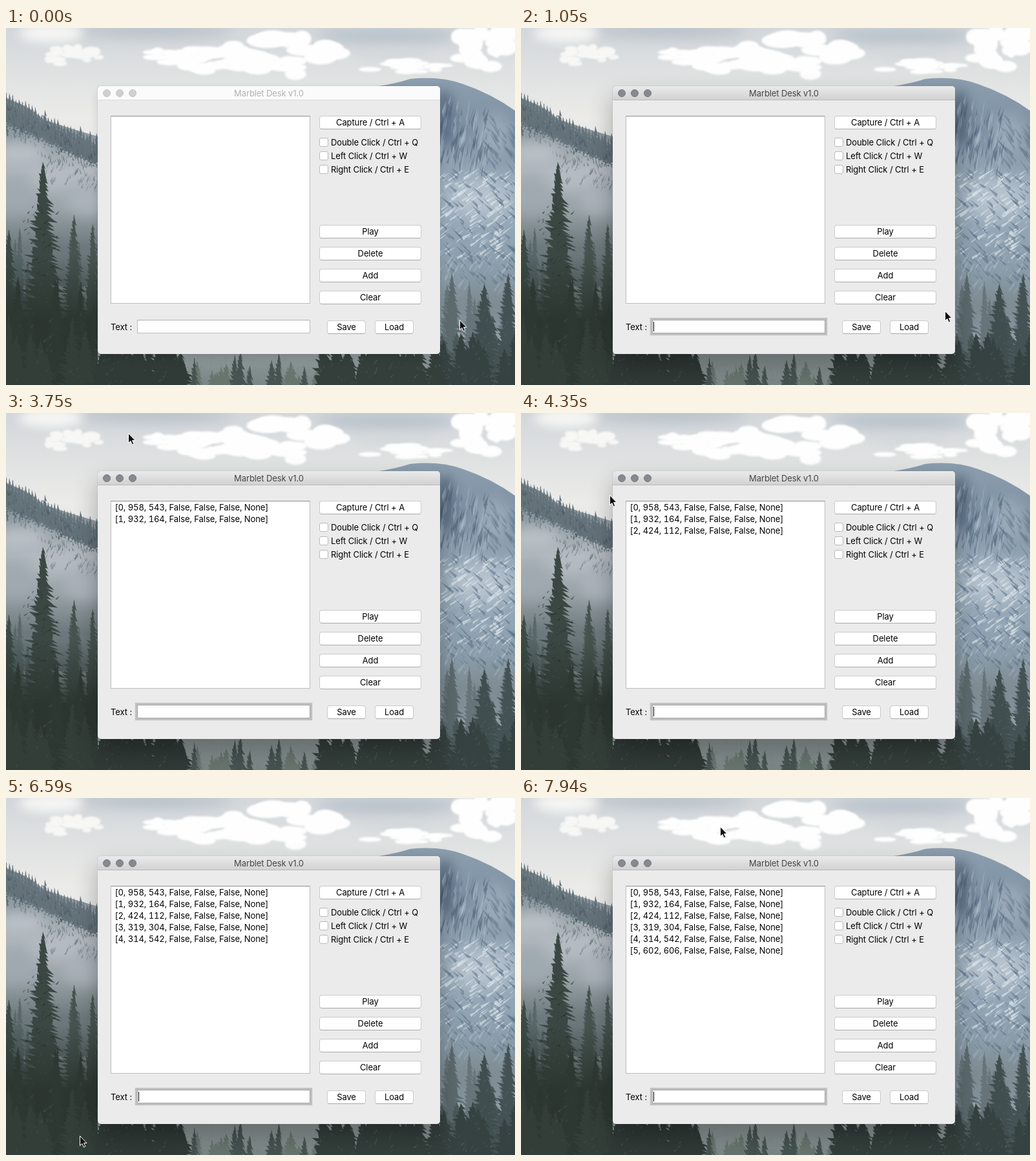
Animation of 788x553 px, one loop 8000 ms. Source, as an HTML page with a canvas:

```html
<!DOCTYPE html>
<html lang="en">
<head>
<meta charset="utf-8">
<style>
  html, body { margin: 0; width: 100%; height: 100%; overflow: hidden; }
  body { position: relative; font: 13px/18px Inter, sans-serif; letter-spacing: -.1px; color: #000; }
  canvas, #cursor { position: absolute; left: 0; top: 0; }
  #cursor { overflow: visible; }
  #win, #win div { position: absolute; box-sizing: border-box; white-space: pre; }
  #win { left: 142px; top: 90px; width: 530px; height: 415px; border-radius: 5px; background: #ebebeb;
    box-shadow: 0 0 1px rgba(0,0,0,.45), 0 6px 14px rgba(0,0,0,.12); }
  #win.active { box-shadow: 0 0 1px rgba(0,0,0,.5), 0 18px 36px rgba(0,0,0,.3); }
  #win .bar { left: 0; top: 0; width: 530px; height: 22px; border-radius: 5px 5px 0 0; text-align: center;
    line-height: 22px; color: #b1b1b1; background: #fbfbfb; border-bottom: 1px solid #d9d9d9; }
  #win.active .bar { color: #454545; background: linear-gradient(#eaeaea, #d2d2d2); border-color: #b9b9b9; }
  #win .light { width: 12px; height: 12px; border-radius: 50%; background: #d0d0d0; border: 1px solid #c4c4c4; }
  #win.active .light { background: #858a90; border-color: #757a80; }
  #win .box { background: #fff; border: 1px solid #bebebe; border-top-color: #8e8e8e; }
  #win .field { border-top-color: #b0b0b0; }
  #win.active .field { box-shadow: 0 0 1px 3px #c0c0c0; border-color: #a8a8a8; }
  #win .button { background: #fff; border: 1px solid #cbcbcb; border-bottom-color: #aaa; border-radius: 4px;
    text-align: center; line-height: 19px; }
  #win .pressed { background: linear-gradient(#96999e, #6c7077); border-color: #72767c; color: #fff; }
  #win .check { background: #fff; border: 1px solid #bababa; border-radius: 3px; }
  #win .row { font-variant-numeric: tabular-nums; letter-spacing: -.07px; }
  #win .caret { background: #000; }
</style>
</head>
<body>
<canvas id="scene" width="788" height="553"></canvas>
<div id="win"></div>
<svg id="cursor" width="12" height="19">
  <path d="M0 0V15L3.4 11.9L5.8 17.4L8.3 16.3L6 11H10.5Z" fill="#111" stroke="#fff"/>
</svg>
<script>
const W = 788, H = 553, LOOP = 8000, STEP = 150, ACTIVATE = 1050;
const ctx = document.getElementById('scene').getContext('2d');
const win = document.getElementById('win');
const cursor = document.getElementById('cursor');

// ---- Landscape ----
let seed = 7;
const rnd = (a = 0, b = 1) => {
  seed = (seed * 16807) % 2147483647;
  return a + (b - a) * seed / 2147483647;
};
function shade(y0, y1, ...colors) {
  const g = ctx.createLinearGradient(0, y0, 0, y1);
  colors.forEach((c, i) => g.addColorStop(i / (colors.length - 1), c));
  return g;
}
function blob(x, y, rx, ry, color, blur = 8) {
  ctx.filter = `blur(${blur}px)`;
  ctx.fillStyle = color;
  ctx.beginPath();
  ctx.ellipse(x, y, rx, ry, 0, 0, 7);
  ctx.fill();
  ctx.filter = 'none';
}
// A ragged cloud: a heap of small puffs inside an ellipse
function cloud(x, y, rx, ry, color) {
  for (let i = 0; i < 26; i++) {
    const a = rnd(0, 6.28), r = rnd() ** .5;
    blob(x + rx * r * Math.cos(a), y + ry * r * Math.sin(a), rnd(.12, .34) * rx, rnd(.2, .4) * ry, color, 1.5);
  }
}
function shape(fill, path) {
  ctx.fillStyle = fill;
  ctx.fill(new Path2D(path));
}
// Short slanted slivers along a band that may slope
function slivers(count, x0, x1, y0, y1, dx, dy, color, slope = 0) {
  ctx.fillStyle = color;
  for (let i = 0; i < count; i++) {
    const x = rnd(x0, x1), y = rnd(y0, y1) + slope * (x - x0), k = rnd(.3, 1);
    ctx.beginPath();
    ctx.moveTo(x, y);
    ctx.lineTo(x + dx * k, y + dy * k);
    ctx.lineTo(x + dx * k + rnd(-3, 3), y + dy * k * .5 + rnd(1, 4));
    ctx.fill();
  }
}
function tree(x, top, base, half, color) {
  ctx.fillStyle = color;
  ctx.beginPath();
  ctx.moveTo(x, top);
  const side = (dir, y) => {
    const reach = half * Math.min(1, (y - top) / (base - top) * 1.5) ** .85;
    ctx.lineTo(x + dir * (1 + reach * rnd(.45, 1.15)), y + rnd(-1, 3));
    ctx.lineTo(x + dir * reach * rnd(.25, .6), y - dir * 2);
  };
  for (let y = top + 5; y < base; y += 6) side(1, y);
  for (let y = base; y > top + 4; y -= 6) side(-1, y);
  ctx.fill();
}
function forest(count, x0, x1, top0, top1, half, color) {
  for (let i = 0; i < count; i++) tree(rnd(x0, x1), rnd(top0, top1), H + 20, rnd(.7, 1.2) * half, color);
}
function drawScene() {
  ctx.fillStyle = shade(0, H, '#d3d7da', '#ebebe9', '#e2e3e3', '#a9b3ba', '#7d8789');
  ctx.fillRect(0, 0, W, H);
  blob(230, 4, 120, 12, '#b9c2ca', 10);
  blob(590, 12, 110, 14, '#b9c3cc', 10);
  blob(600, 40, 50, 7, '#d2d7da');
  blob(70, 8, 50, 14, '#f6f6f5');
  cloud(100, 45, 45, 16, '#f7f7f6');
  cloud(280, 50, 72, 18, '#fefefe');
  cloud(425, 46, 95, 32, '#fefefe');
  cloud(618, 62, 62, 12, '#fefefe');
  cloud(750, 28, 58, 34, '#fefefe');

  // left ridge and mist
  shape(shade(105, 340, '#7d8990', '#8f9aa2', '#b3babf', '#98a2a7', '#6c787b'),
    'M0 108L30 121L62 143L92 153L142 168V400H0Z');
  for (let x = 0; x < 146; x += 5) tree(x, 98 + x * .46 + rnd(0, 12), 150 + x * .45, 6, '#64727a');
  slivers(170, 0, 146, 116, 166, 2, 13, 'rgba(69,84,93,.55)', .48);
  blob(22, 195, 38, 18, '#b9c0c5', 10);
  blob(75, 232, 50, 16, '#b4bcc2', 10);
  blob(125, 265, 32, 24, '#aab3b9', 10);
  blob(15, 255, 30, 28, '#9fa9b0', 12);
  slivers(50, 60, 146, 196, 226, -6, 14, 'rgba(88,103,112,.4)', .35);

  // right mountain
  shape(shade(78, 420, '#8c9eae', '#7c90a3', '#9cadbc', '#90a3b3', '#84959f'),
    'M540 95Q600 88 625 79Q672 74 708 87Q752 102 788 128V470H540Z');
  blob(680, 140, 16, 44, 'rgba(75,96,117,.6)', 8);
  blob(756, 165, 28, 32, 'rgba(170,184,197,.6)', 10);
  blob(735, 265, 50, 30, 'rgba(196,207,217,.7)', 14);
  slivers(90, 674, 752, 100, 195, -6, 42, 'rgba(178,192,204,.4)', .2);
  slivers(70, 672, 750, 105, 200, -7, 38, 'rgba(66,88,109,.38)', .2);
  slivers(60, 735, 790, 125, 200, 16, 26, 'rgba(92,113,133,.35)', .3);
  slivers(190, 668, 788, 215, 350, -18, 15, 'rgba(225,232,238,.62)');
  slivers(150, 668, 788, 215, 390, 15, 17, 'rgba(86,108,129,.5)');
  slivers(60, 668, 788, 340, 410, -12, 22, 'rgba(190,202,212,.4)');

  // right forest
  blob(730, 430, 80, 24, '#7f8c92', 14);
  forest(7, 672, 790, 390, 425, 20, '#67757a');
  tree(690, 378, 573, 24, '#5c6a6e');
  forest(8, 672, 790, 430, 475, 24, '#4b585a');
  tree(740, 397, 573, 33, '#414e50');
  tree(777, 380, 573, 28, '#455255');
  forest(9, 672, 790, 465, 510, 26, '#364241');
  slivers(110, 672, 788, 430, 545, -6, 7, 'rgba(108,122,122,.3)');

  // left forest
  forest(9, -8, 150, 305, 360, 20, '#59676a');
  tree(105, 289, 573, 27, '#46534f');
  tree(134, 303, 573, 24, '#485552');
  tree(4, 312, 573, 30, '#3c4945');
  tree(57, 207, 500, 38, '#3b4743');
  shape(shade(350, H, 'rgba(43,53,48,0)', '#2c3631', '#2a332e'), 'M0 350H142V553H0Z');
  forest(10, -5, 145, 385, 470, 22, '#2e3833');
  forest(8, -5, 150, 440, 505, 22, '#323e37');
  slivers(130, 0, 142, 330, 545, -6, 7, 'rgba(96,112,102,.28)');
  slivers(60, 28, 84, 270, 400, -7, 6, 'rgba(30,39,36,.6)');

  // foot of the valley
  shape(shade(495, H, '#929c9c', '#7a8685'), 'M142 495H672V553H142Z');
  forest(24, 140, 275, 470, 505, 22, '#303a37');
  forest(16, 285, 480, 500, 540, 12, '#68756f');
  forest(8, 285, 480, 500, 535, 10, '#465350');
  forest(28, 480, 680, 470, 512, 21, '#343f3c');
  slivers(130, 142, 672, 506, 548, -6, 7, 'rgba(112,126,122,.35)');
}

// ---- Window, placed in stage coordinates ----
function add(kind, x, y, w, h, text = '') {
  const el = document.createElement('div');
  el.className = kind;
  el.textContent = text;
  Object.assign(el.style, { left: x - 142 + 'px', top: y - 90 + 'px' });
  if (w) Object.assign(el.style, { width: w + 'px', height: h + 'px' });
  win.append(el);
  return el;
}
const label = (x, middle, text, kind = 'label') => add(kind, x, middle - 9, 0, 0, text);

add('bar', 142, 90, 530, 22, 'Marblet Desk v1.0');
for (const x of [150, 170, 190]) add('light', x, 95, 12, 12);
add('box', 162, 136, 309, 291);
const capture = add('button', 485, 136, 158, 21, 'Capture / Ctrl + A');
['Double Click / Ctrl + Q', 'Left Click / Ctrl + W', 'Right Click / Ctrl + E'].forEach((text, i) => {
  add('check', 485, 170 + 21 * i, 14, 14);
  label(503, 177 + 21 * i, text);
});
['Play', 'Delete', 'Add', 'Clear'].forEach((text, i) => add('button', 485, 305 + 34 * i, 158, 21, text));
label(162, 463, 'Text :');
add('box field', 203, 452, 268, 21);
const caret = add('caret', 205, 455, 1, 15);
add('button', 497, 453, 60, 21, 'Save');
add('button', 571, 453, 60, 21, 'Load');

// ---- Motion ----
const captures = [
  { at: 1800, pos: '958, 543' },
  { at: 2850, pos: '932, 164' },
  { at: 3900, pos: '424, 112' },
  { at: 4800, pos: '319, 304' },
  { at: 6000, pos: '314, 542' },
  { at: 7200, pos: '602, 606' },
];
captures.forEach((c, i) => {
  c.row = label(168.5, 146 + 18 * i, `[${i}, ${c.pos}, False, False, False, None]`, 'row');
});

// start, end, target, optional control point
const moves = [
  [150, 750, [656, 438]],
  [1050, 1500, [723, 462]],
  [1950, 2550, [698, 83], [683, 280]],
  [3000, 3600, [189, 31]],
  [4050, 4650, [85, 223]],
  [4950, 5565, [80, 461]],
  [6150, 7200, [368, 525], [58, 571]],
  [7350, 7950, [308, 44]],
];
function cursorAt(t) {
  let p = [702, 452];
  for (const [start, end, to, via] of moves) {
    if (t <= start) break;
    const u = Math.min(1, (t - start) / (end - start)), s = u * u * (3 - 2 * u);
    p = p.map((from, i) => {
      const mid = via ? via[i] : (from + to[i]) / 2;
      return (1 - s) ** 2 * from + 2 * s * (1 - s) * mid + s * s * to[i];
    });
  }
  return p.map(Math.round);
}
const show = (el, on) => { el.style.visibility = on ? 'visible' : 'hidden'; };

function render(now) {
  const t = Math.floor((now % LOOP + 10) / STEP) * STEP;
  const active = t >= ACTIVATE;
  win.classList.toggle('active', active);
  show(caret, active && t % 1200 >= 600);
  capture.classList.toggle('pressed', captures.some(c => t === c.at));
  for (const c of captures) show(c.row, t > c.at);
  const [x, y] = cursorAt(t);
  cursor.style.transform = `translate(${x + .5}px, ${y + .5}px)`;
}

drawScene();
const begin = performance.now();
(function tick() {
  render(performance.now() - begin);
  requestAnimationFrame(tick);
})();
</script>
</body>
</html>
```
